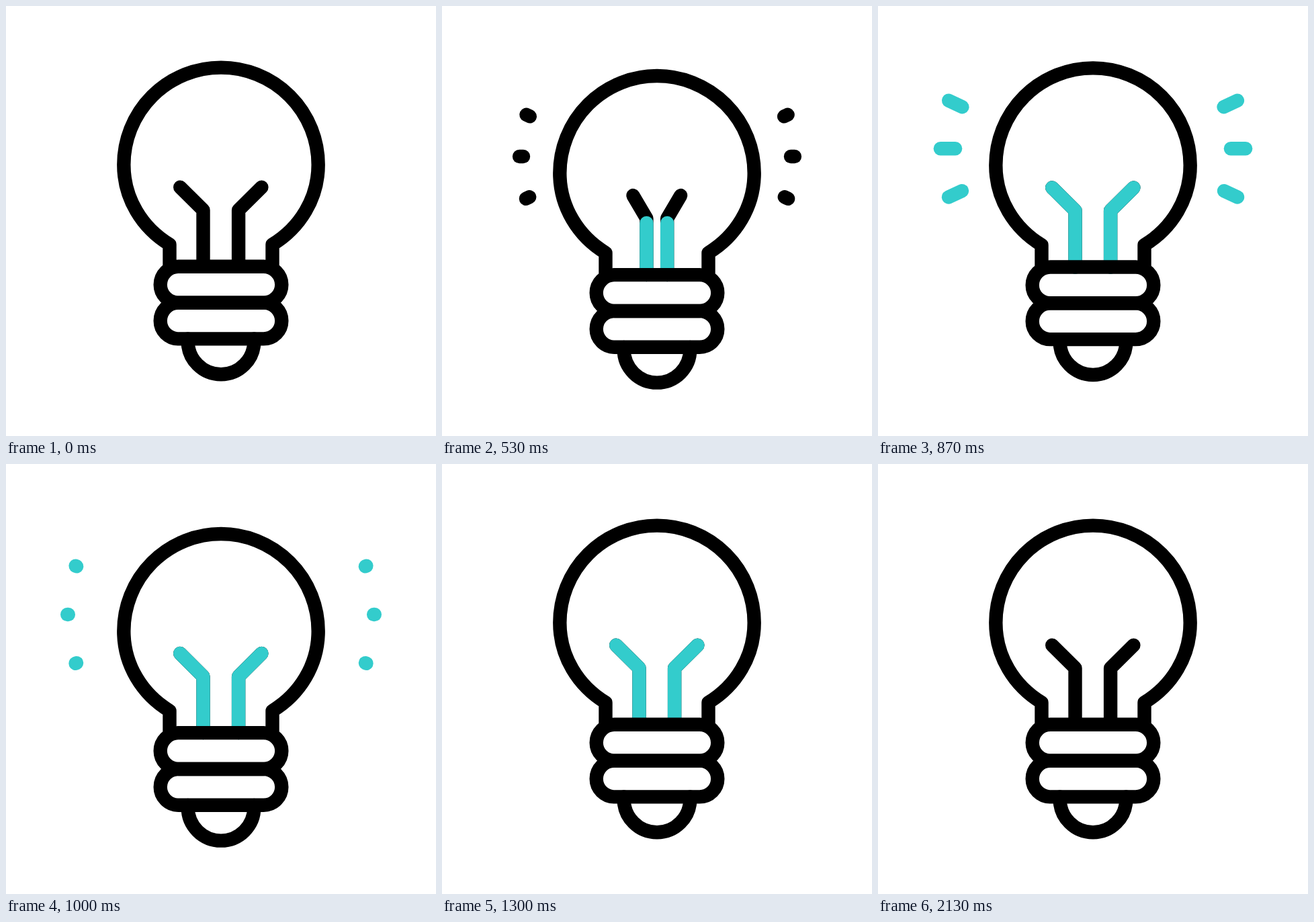
Animation of 640x640 px, one loop 2500 ms. Source, as an HTML page:

```html
<!DOCTYPE html>
<html lang="en">
<head>
<meta charset="utf-8">
<title>Light bulb</title>
<style>
  html, body { margin: 0; width: 100%; height: 100%; overflow: hidden; background: #fff; }
  svg { display: block; width: 100vw; height: 100vh; }
  path, rect { fill: none; stroke: #000; stroke-width: 20.4; stroke-linecap: round; stroke-linejoin: round; }
  .teal { stroke: #3cc; }
</style>
</head>
<body>
<svg viewBox="0 0 640 640">
  <g id="bulb">
    <g id="lines"></g>
    <path d="M243.5 388V355C202.6 330.2 175.3 286.5 175.3 236.3A144.7 144.7 0 0 1 464.7 236.3C464.7 286.5 437.4 330.2 396.5 355V388"/>
    <rect x="229.7" y="387.8" width="180.6" height="53.8" rx="26.9"/>
    <rect x="229.7" y="441.6" width="180.6" height="53.8" rx="26.9"/>
    <path d="M270.7 495.5V499A49.3 49.3 0 0 0 369.3 499V495.5"/>
  </g>
</svg>
<script>
const LOOP = 2500, FPS = 30;
const bulb = document.getElementById('bulb');
const lines = document.getElementById('lines');

function addPath(cls) {
  const p = document.createElementNS('http://www.w3.org/2000/svg', 'path');
  p.setAttribute('class', cls);
  return lines.appendChild(p);
}

// Eased progress from 0 to 1 between frames a and b
function ease(f, a, b) {
  const x = Math.min(1, Math.max(0, (f - a) / (b - a)));
  return x * x * (3 - 2 * x);
}

// Rises from a to peak, falls back by b
const hump = (f, a, peak, b) => f < peak ? ease(f, a, peak) : 1 - ease(f, peak, b);

// Path data for the part of a polyline between fractions from and to
function trim(pts, from, to) {
  if (to - from < 0.001) return '';
  const lens = pts.slice(1).map((p, i) => Math.hypot(p[0] - pts[i][0], p[1] - pts[i][1]));
  const total = lens.reduce((s, l) => s + l, 0);
  const out = [];
  let pos = 0;
  lens.forEach((len, i) => {
    const a = Math.max(0, (from * total - pos) / len);
    const b = Math.min(1, (to * total - pos) / len);
    if (a < b) {
      for (const k of [a, b]) {
        out.push([0, 1].map(n => (pts[i][n] + (pts[i + 1][n] - pts[i][n]) * k).toFixed(2)).join(' '));
      }
    }
    pos += len;
  });
  return 'M' + out.join('L');
}

// Inner and outer ends, as distance from the centre line and height
const rayShapes = [
  [[189.2, 152], [216.4, 139.3]],
  [[199, 211.6], [228.8, 211.6]],
  [[189.8, 272], [216.5, 284.5]]
];
const strokePair = () => ({ dark: addPath('dark'), teal: addPath('teal') });
const rays = [];
for (const side of [-1, 1]) {
  for (const shape of rayShapes) {
    rays.push({ pts: shape.map(([x, y]) => [320 + side * x, y]), ...strokePair() });
  }
}
const wires = [-1, 1].map(side => ({ side, ...strokePair() }));

function draw(f) {
  const bounce = hump(f, 11, 20.5, 25) + hump(f, 25, 34.5, 39);
  bulb.setAttribute('transform', `translate(0 ${(22.9 * bounce).toFixed(2)})`);

  const squeeze = 1 - 0.615 * hump(f, 9, 20.3, 26);
  for (const w of wires) {
    const x = d => 319.8 + w.side * d * squeeze;
    const pts = [[x(26.3), 387.8], [x(26.3), 303.8], [x(60.6), 269.7]];
    w.dark.setAttribute('d', trim(pts, 0, 1));
    w.teal.setAttribute('d', trim(pts, ease(f, 52, 64), ease(f, 9, 21)));
  }

  for (const r of rays) {
    r.dark.setAttribute('d', trim(r.pts, ease(f, 20, 25), ease(f, 14, 21)));
    r.teal.setAttribute('d', trim(r.pts, ease(f, 24, 31), ease(f, 20, 27)));
  }
}

const start = performance.now();
function tick() {
  const t = (performance.now() - start) % LOOP;
  draw(Math.floor((t + 5) * FPS / 1000));
  requestAnimationFrame(tick);
}
tick();
</script>
</body>
</html>
```
